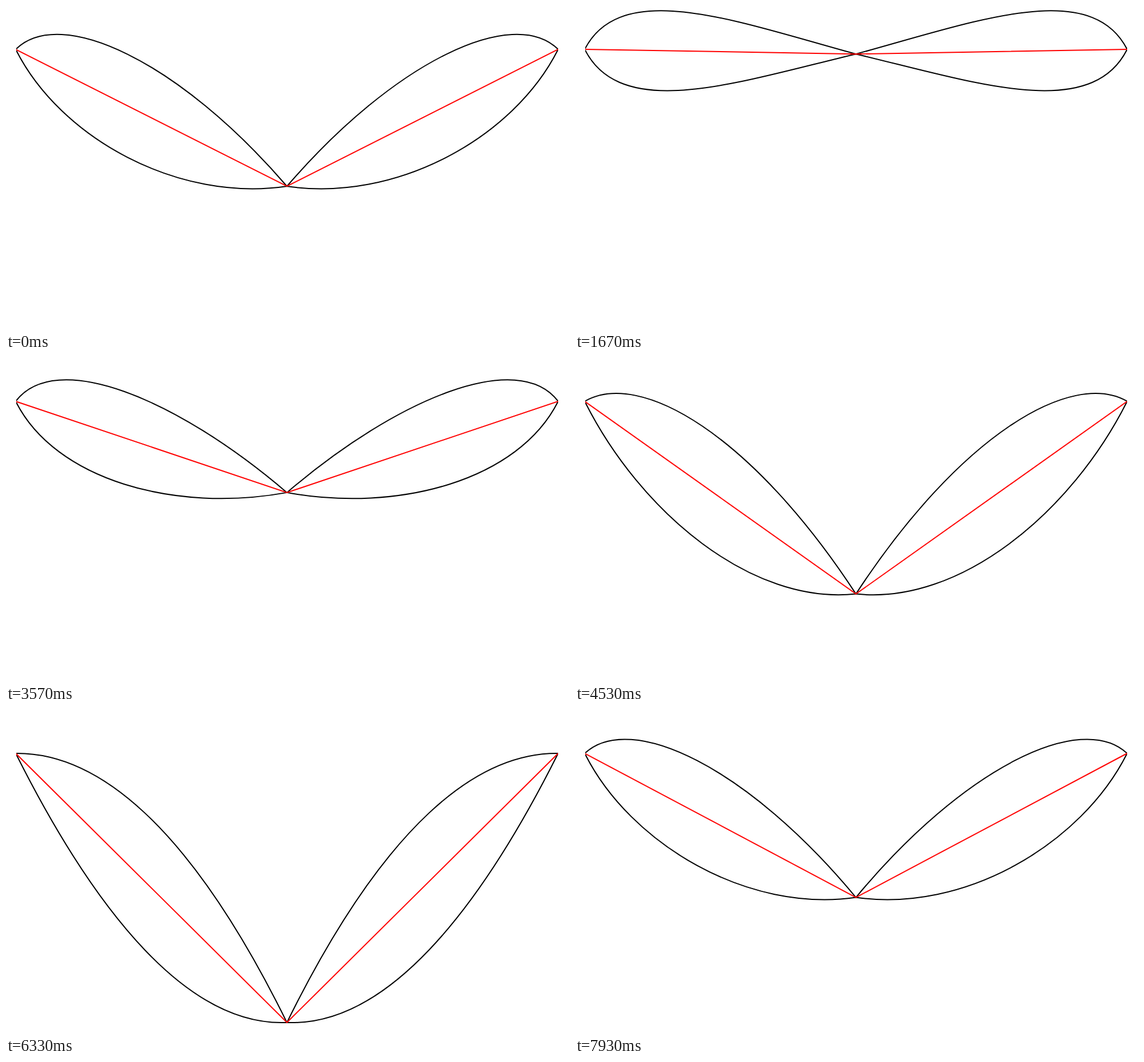
An HTML page that plays this animation: 985 by 568 pixels, repeating every 7.96 s.

```html
<!DOCTYPE html>
<html lang="en">
<head>
<meta charset="utf-8">
<title>Wings</title>
<style>
  html, body { margin: 0; width: 100%; height: 100%; overflow: hidden; background: #fff; }
  svg { display: block; width: 985px; height: 568px; }
  path { fill: none; stroke: #000; stroke-width: 2; }
  #chords { stroke: #f00; }
</style>
</head>
<body>
<svg viewBox="0 0 985 568">
  <clipPath id="stage"><rect x="18" width="948" height="568"/></clipPath>
  <g clip-path="url(#stage)">
    <path id="upper"/>
    <path id="lower"/>
    <path id="chords"/>
  </g>
</svg>
<script>
  const LOOP = 7960, STEPS = 240;
  const LEFT = 17, RIGHT = 966, MID = (LEFT + RIGHT) / 2, TOP = 76, SWING = 240;
  const upper = document.getElementById('upper');
  const lower = document.getElementById('lower');
  const chords = document.getElementById('chords');

  // Draws a curve from each outer end to the hinge, mirrored left and right.
  function pair(drop, [x1, y1], [x2, y2]) {
    const half = (x, dir) =>
      `M${x} ${TOP}C${x + dir * x1} ${TOP + y1} ${x + dir * x2} ${TOP + y2} ${MID} ${TOP + drop}`;
    return half(LEFT, 1) + half(RIGHT, -1);
  }

  function draw(ms) {
    // Steps of 1/30 s, with their starts rounded to 10 ms.
    const step = Math.floor((Math.floor(ms / 10) * 3 + 1) / 10);
    const drop = SWING * (1 - Math.sin(2 * Math.PI * step / STEPS));
    const slope = drop / (MID - LEFT);

    // The lower curve always leaves its outer end at a slope of 2.
    const reach = 64 + 78 * slope ** 2.5;
    const outer = [reach, 2 * reach];
    const inner = [267 + 36 * slope, drop + 50 - 42.5 * slope];

    // The upper curve is the lower one reflected vertically in the chord.
    const reflect = ([x, y]) => [x, 2 * slope * x - y];

    lower.setAttribute('d', pair(drop, outer, inner));
    upper.setAttribute('d', pair(drop, reflect(outer), reflect(inner)));
    chords.setAttribute('d', `M${LEFT} ${TOP}L${MID} ${TOP + drop}L${RIGHT} ${TOP}`);
  }

  const start = performance.now();
  function tick() {
    draw((performance.now() - start) % LOOP);
    requestAnimationFrame(tick);
  }
  draw(0);
  requestAnimationFrame(tick);
</script>
</body>
</html>
```
